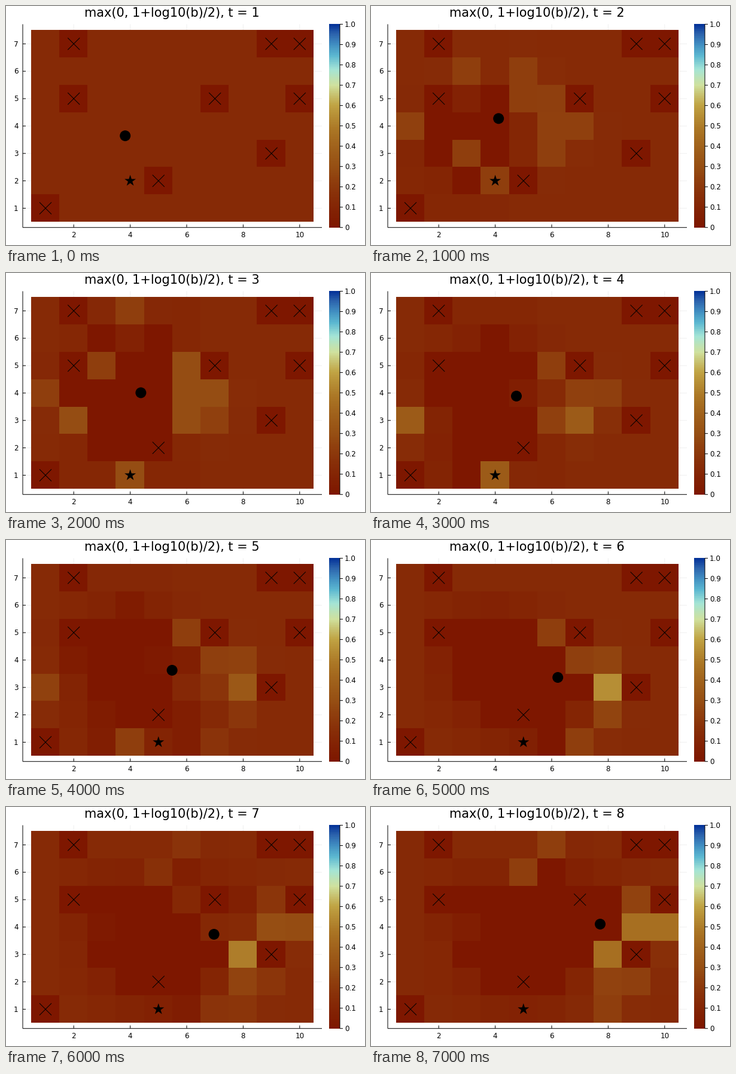
Write a matplotlib script that moves like this. It is 600 px wide and 400 px high and loops after 8000 ms.

```python
import numpy as np
import matplotlib.pyplot as plt
from matplotlib.animation import FuncAnimation
from matplotlib.colors import LinearSegmentedColormap

W, H, DPI = 600, 400, 100
PX = 72 / DPI
COLS, ROWS = 10, 7
LEFT, RIGHT, TOP, BOTTOM = 28, 528, 30.5, 370.7
MAP_L, MAP_R, MAP_T, MAP_B = 42.4, 514.4, 40.4, 361.4
BAR_L, BAR_R = 540, 558
UNIFORM, WARM = 0.125, 0.23

plt.rcParams["font.family"] = "DejaVu Sans"

OBSTACLES = [(1, 1), (2, 7), (2, 5), (7, 5), (5, 2), (9, 3), (9, 7), (10, 7),
             (10, 5)]

# Key steps: robot position, searched blocks (x0, x1, y0, y1),
# value of the hottest cells, hot cells, warm cells.
KEYS = {
    1: ((199.2, 217.2), [], 0, [], []),
    2: ((213.2, 188.3),
        [(2, 4, 4, 4), (4, 4, 3, 5), (2, 2, 3, 3), (3, 3, 2, 2)],
        0.24, [(1, 4), (6, 4), (7, 4)],
        [(3, 6), (5, 6), (5, 5), (6, 5), (3, 3), (6, 3), (4, 2)]),
    3: ((225.4, 200.4),
        [(2, 5, 4, 4), (3, 5, 2, 3), (4, 5, 5, 5), (3, 3, 6, 6), (5, 5, 6, 6)],
        0.29, [(2, 3), (4, 1), (6, 5), (6, 4), (7, 4), (6, 3)],
        [(3, 5), (1, 4), (4, 7), (7, 3)]),
    4: ((243, 206),
        [(2, 4, 4, 4), (3, 5, 2, 3), (3, 5, 5, 5), (4, 4, 6, 6), (3, 3, 1, 1)],
        0.36, [(1, 3), (7, 3), (4, 1)],
        [(6, 5), (7, 4), (8, 4), (6, 3)]),
    6: ((312.2, 230),
        [(3, 6, 4, 4), (3, 7, 3, 3), (4, 6, 2, 2), (3, 5, 5, 5), (6, 6, 1, 1)],
        0.55, [(8, 3)],
        [(6, 5), (7, 4), (8, 4), (8, 2), (7, 1)]),
    8: ((383, 196),
        [(4, 8, 4, 4), (3, 7, 3, 3), (4, 6, 2, 2), (3, 8, 5, 5), (6, 6, 6, 6)],
        0.45, [(8, 3), (9, 4), (10, 4)],
        [(6, 7), (5, 6), (9, 5), (8, 2), (9, 2), (8, 1)]),
}


def belief(blocks, peak, hot, warm):
    """Searched cells are empty, their surroundings dim, hot cells spill."""
    searched = np.zeros((ROWS, COLS))
    for x0, x1, y0, y1 in blocks:
        searched[y0 - 1:y1, x0 - 1:x1] = 1
    pad = np.pad(searched, 1)
    near = sum(pad[j:j + ROWS, i:i + COLS]
               for j in range(3) for i in range(3)) / 9
    grid = UNIFORM * (1 - near)

    ys, xs = np.mgrid[1:ROWS + 1, 1:COLS + 1]
    for level, cells in ((WARM, warm), (peak, hot)):
        for x, y in cells:
            spill = np.exp(-2.5 * ((xs - x) ** 2 + (ys - y) ** 2))
            grid = np.maximum(grid, grid + (level - grid) * spill)

    grid[searched == 1] = 0
    for x, y in OBSTACLES:
        grid[y - 1, x - 1] = 0
    return grid


def between(values, t):
    """Value at step t, halfway between the key steps where t is not one."""
    if t in values:
        return values[t]
    return (values[t - 1] + values[t + 1]) / 2


def log_colormap():
    """Brown to blue scale, stretched logarithmically."""
    colors = ["#7E1700", "#975014", "#AB7625", "#C1A444", "#D0E19E",
              "#A5E5D6", "#5CB8D1", "#408CC1", "#2B61AC", "#033198"]
    linear = LinearSegmentedColormap.from_list("linear", colors, N=1024)
    stretch = (10 ** np.linspace(0, 1, 256) - 1) / 9
    return LinearSegmentedColormap.from_list("log", linear(stretch))


def px(x):
    return MAP_L + (x - 0.5) * (MAP_R - MAP_L) / COLS


def py(y):
    return MAP_B - (y - 0.5) * (MAP_B - MAP_T) / ROWS


fig = plt.figure(figsize=(W / DPI, H / DPI), dpi=DPI, facecolor="white")
ax = fig.add_axes([0, 0, 1, 1])
ax.axis("off")
cmap = log_colormap()


def line(xs, ys, color="black", z=3):
    ax.plot(xs, ys, color=color, lw=PX, zorder=z, snap=False,
            solid_capstyle="butt")


def label(x, y, text, ha):
    ax.text(x, y + 4.3, text, fontsize=8.6, ha=ha, va="baseline")


def image(data, left, right, bottom, top):
    return ax.imshow(data, cmap=cmap, vmin=0, vmax=1, aspect="auto",
                     origin="lower", extent=(left, right, bottom, top),
                     interpolation="nearest", zorder=2)


def draw_axes():
    for x in range(2, COLS + 1, 2):
        line([px(x)] * 2, [TOP, BOTTOM], "#f0f0f0", z=0)
        line([px(x)] * 2, [BOTTOM, BOTTOM - 5])
        label(px(x), 383, str(x), "center")
    for y in range(1, ROWS + 1):
        line([LEFT, RIGHT], [py(y)] * 2, "#f0f0f0", z=0)
        line([LEFT, LEFT + 5], [py(y)] * 2)
        label(20.5, py(y), str(y), "right")
    line([LEFT, LEFT], [TOP, BOTTOM])
    line([LEFT, RIGHT], [BOTTOM, BOTTOM])


def draw_colorbar():
    image(np.linspace(0, 1, 256)[:, None], BAR_L, BAR_R, BOTTOM, TOP)
    line([BAR_R, BAR_R], [TOP, BOTTOM])
    for i in range(11):
        y = BOTTOM - i * (BOTTOM - TOP) / 10
        line([BAR_R, BAR_R + 5], [y, y])
        label(566, y, f"{i / 10:.1f}" if i else "0", "left")


def draw_obstacles():
    for x, y in OBSTACLES:
        cx, cy = px(x), py(y)
        for s in (10, -10):
            line([cx - 10, cx + 10], [cy - s, cy + s], z=4)


def star_points(cx, cy, radius=10):
    angle = np.arange(10) * np.pi / 5
    r = np.where(np.arange(10) % 2, 0.382, 1) * radius
    return np.stack([cx + r * np.sin(angle), cy - r * np.cos(angle)], axis=1)


beliefs = {t: belief(*key[1:]) for t, key in KEYS.items()}
robot_path = {t: np.array(key[0]) for t, key in KEYS.items()}

draw_axes()
draw_colorbar()
draw_obstacles()
heat = image(beliefs[1], MAP_L, MAP_R, MAP_B, MAP_T)
robot = ax.add_patch(plt.Circle(robot_path[1], 9, fc="black", lw=0, zorder=5))
star = ax.add_patch(plt.Polygon(star_points(0, 0), fc="black", lw=0, zorder=5))
title = ax.text(277.6, 18.5, "", fontsize=15, ha="center", va="baseline")
ax.set(xlim=(0, W), ylim=(H, 0))


def update(i):
    t = i + 1
    heat.set_data(between(beliefs, t))
    robot.center = between(robot_path, t)
    star_x = 4 if t < 5 else 5
    star_y = 2 if t < 3 else 1
    star.set_xy(star_points(px(star_x), py(star_y)))
    title.set_text(f"max(0, 1+log10(b)/2), t = {t}")
    return heat, robot, star, title


anim = FuncAnimation(fig, update, frames=8, interval=1000, repeat=True,
                     repeat_delay=0)
plt.show()
```
